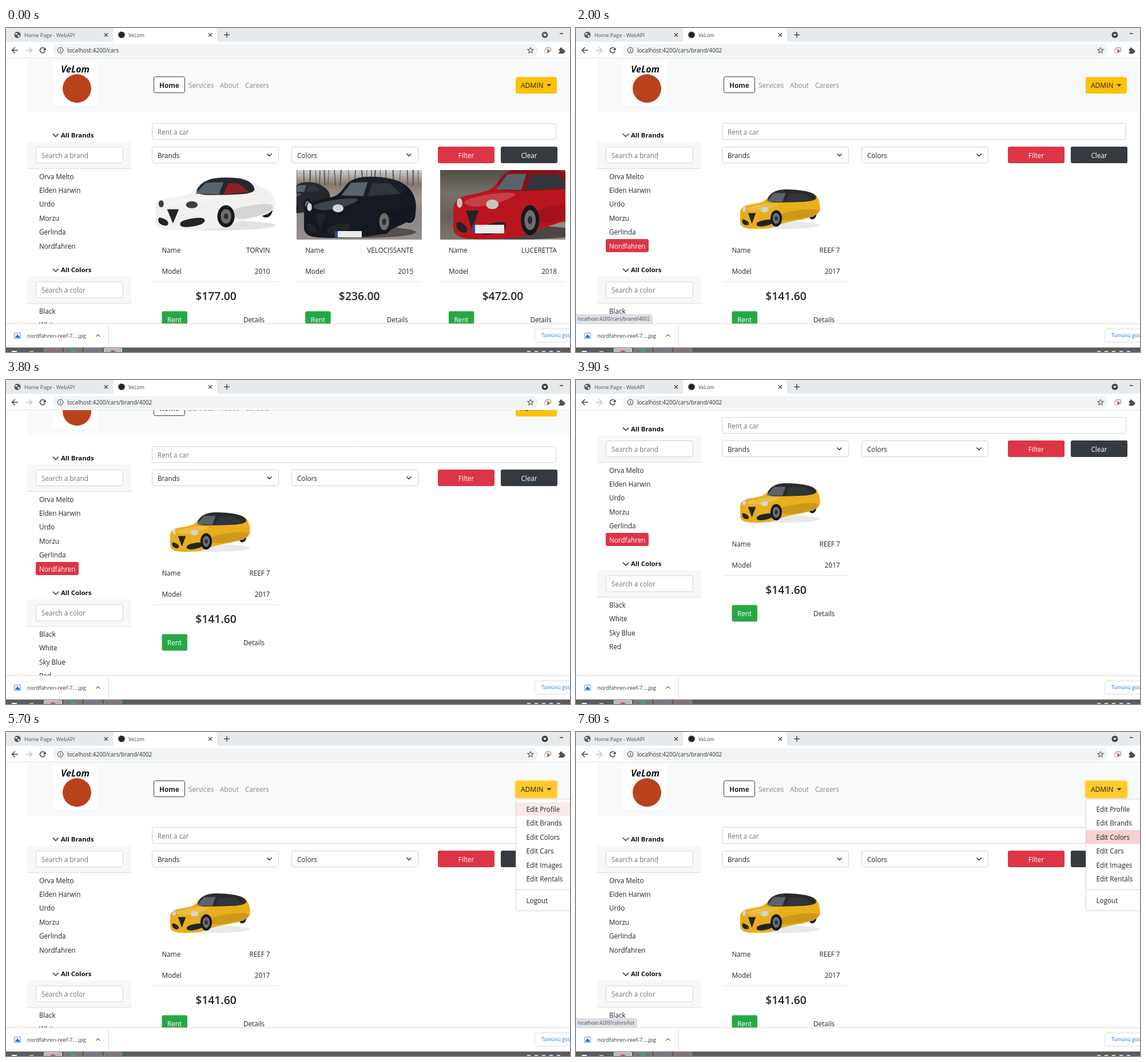
An HTML page with a canvas that plays this animation: 986 by 568 pixels, repeating every 8000 ms.

```html
<!DOCTYPE html>
<html lang="en">
<head>
<meta charset="utf-8">
<title>Car rental</title>
<style>
  html, body { margin: 0; width: 100%; height: 100%; overflow: hidden; background: #fff; }
  canvas { display: block; width: 986px; height: 568px; }
</style>
</head>
<body>
<canvas id="stage" width="986" height="568"></canvas>
<script>
const c = document.getElementById('stage').getContext('2d');
const LOOP = 8000, ROW = 24.4, CARD = 250.7;
const INK = '#212529', GREY = '#6c757d', LINE = '#ced4da', RED = '#dc3545';
const ICON = '#3c4043', SOFT = '#5f6368', EDGE = '#dadce0';
const FONT = '"Open Sans", "Noto Sans", sans-serif';

const brands = ['Orva Melto', 'Elden Harwin', 'Urdo', 'Morzu', 'Gerlinda', 'Nordfahren'];
const colors = ['Black', 'White', 'Sky Blue', 'Red'];
const menu = ['Profile', 'Brands', 'Colors', 'Cars', 'Images', 'Rentals'];
const fleet = [
  { name: 'TORVIN', year: 2010, price: '$177.00', photo: roadster },
  { name: 'VELOCISSANTE', year: 2015, price: '$236.00', photo: coupe },
  { name: 'LUCERETTA', year: 2018, price: '$472.00', photo: redCar }
];
const found = [{ name: 'REEF 7', year: 2017, price: '$141.60', photo: hatchback }];

// Motion: everything advances in steps of 100 ms
const clamp = (v, lo, hi) => Math.min(hi, Math.max(lo, v));
const ramp = (t, from, to) => clamp((t - from) / (to - from), 0, 1);
const within = (t, from, to) => t >= from && t < to;

const scrollAt = t => within(t, 3800, 4700) ? 102 * ramp(t, 3700, 3900) : 0;
const brandAt = t => within(t, 1000, 5400) ? (t < 1100 ? 4 : 5) : -1;
const statusAlpha = t => ramp(t, 1300, 1500) - ramp(t, 2600, 2900) + ramp(t, 6700, 6900);
function menuAt(t) {
  if (t < 5700) return -1;
  if (t < 6500) return clamp((t - 5900) / 100, 0, 4);
  if (t < 7200) return 5;
  return clamp(4 - Math.floor((t - 7200) / 200), 2, 4);
}
function statusUrl(t) {
  if (t < 5000) return 'localhost:4200/cars/brand/4002';
  const item = menu[menuAt(t)] || 'Cars';
  return `localhost:4200/${item === 'Images' ? 'carimages' : item.toLowerCase()}/list`;
}

function font(size, weight = 400, style = '') {
  c.font = `${style} ${weight} ${size}px ${FONT}`;
}
function text(s, x, y, { size = 11.7, color = INK, align = 'left', weight = 400, style = '' } = {}) {
  font(size, weight, style);
  c.fillStyle = color;
  c.textAlign = align;
  c.fillText(s, x, y);
}
function rect(x, y, w, h, color) {
  c.fillStyle = color;
  c.fillRect(x, y, w, h);
}
function box(x, y, w, h, fill, stroke, r = 3) {
  c.beginPath();
  c.roundRect(x, y, w, h, r);
  if (fill) { c.fillStyle = fill; c.fill(); }
  if (stroke) { c.strokeStyle = stroke; c.lineWidth = 1; c.stroke(); }
}
function trace(p) {
  c.beginPath();
  for (let i = 0; i < p.length; i += 2) c.lineTo(p[i], p[i + 1]);
}
function line(color, width, ...p) {
  trace(p);
  c.strokeStyle = color;
  c.lineWidth = width;
  c.stroke();
}
function poly(color, ...p) {
  trace(p);
  c.fillStyle = color;
  c.fill();
}
// Closed shape with rounded corners
function blob(color, ...p) {
  const n = p.length / 2, pt = i => [p[i % n * 2], p[i % n * 2 + 1]];
  c.beginPath();
  for (let i = 0; i <= n; i++) {
    const [x, y] = pt(i), [u, v] = pt(i + 1);
    if (i) c.quadraticCurveTo(x, y, (x + u) / 2, (y + v) / 2);
    else c.moveTo((x + u) / 2, (y + v) / 2);
  }
  c.fillStyle = color;
  c.fill();
}
function oval(color, x, y, rx, ry = rx) {
  c.beginPath();
  c.ellipse(x, y, rx, ry, 0, 0, 7);
  c.fillStyle = color;
  c.fill();
}
function ring(color, width, x, y, r, from = 0, to = 6.3) {
  c.beginPath();
  c.arc(x, y, r, from, to);
  c.strokeStyle = color;
  c.lineWidth = width;
  c.stroke();
}
function chevron(x, y, w) {
  line(INK, 1.4, x - w, y - w / 2, x, y + w / 2, x + w, y - w / 2);
}
function arrow(color, x, dir) {
  line(color, 1.5, x - 5, 39, x + 5, 39);
  line(color, 1.5, x + dir * .5, 34, x + dir * 5.5, 39, x + dir * .5, 44);
}
function cross(x, y) {
  for (const s of [3, -3]) line(ICON, 1.3, x - 3, y - s, x + 3, y + s);
}

// Three-quarter view, facing left, in a unit box; front, rear and cabin place the wheels and roof end
function car({ x, y, w, h, paint, top, side = '#30363b', lamp = '#d0d5d9', shadow, front, rear, cabin }) {
  const wheel = (wx, wy, r) => {
    oval('#17181a', wx, wy, r, r * 3);
    oval('#6b6d70', wx, wy, r * .62, r * 2);
    oval('#2b2d30', wx, wy, r * .25, r * .8);
  };
  c.save();
  c.translate(x, y);
  c.scale(w, h);
  oval(shadow, .52, .92, .5, .1);
  wheel(rear, .6, .055);
  blob(paint, 0, .75, 0, .42, .22, .34, .32, .28, .43, -.02, .7, -.03, cabin, .05, 1.02, .3,
    1.02, .68, front + .08, .86, front - .06, 1, .12, 1.03, 0, .95);
  blob(top, .31, .31, .43, -.02, .7, -.04, cabin, .06, cabin + .04, .28, .58, .32);
  poly('#59636b', .34, .29, .43, .07, .58, .06, .54, .3);
  poly(side, .58, .3, .62, .08, cabin - .12, .08, cabin - .02, .26);
  blob('rgba(255,255,255,.18)', .05, .46, .32, .34, .54, .34, .36, .5, .15, .56);
  blob('rgba(0,0,0,.12)', front, .6, 1, .45, 1, .66, front + .08, .84);
  blob('#222427', .2, .83, .42, .74, .42, .9, .22, .98);
  blob('#222427', .02, .74, .11, .82, .11, .94, .03, .9);
  poly('#222427', .1, .6, .2, .6, .15, .88);
  oval(lamp, .31, .51, .05, .07);
  oval(lamp, .05, .49, .022, .07);
  wheel(front, .74, .073);
  c.restore();
}
function backdrop(x, ...stops) {
  const g = c.createLinearGradient(0, 249, 0, 371);
  stops.forEach((s, i) => g.addColorStop(i / (stops.length - 1), s));
  rect(x, 249, 219, 122, g);
}
function plate(x, y, w, h) {
  rect(x, y, w, h, '#e9ebec');
  rect(x, y, 5, h, '#2b4e9b');
}

function roadster() {
  car({ x: 261, y: 265, w: 206, h: 88, paint: '#f1f1ef', top: '#26282b', side: '#8d2029',
    lamp: '#3a3d42', shadow: '#e2e2e2', front: .6, rear: .94, cabin: .82 });
}
function coupe() {
  backdrop(508, '#cfd0d2', '#86796e', '#a0968e', '#8b8684', '#8f8a88', '#96918e');
  for (let i = 0; i < 22; i++) {
    const x = 508 + i * 10 + 4 * Math.sin(i * 7);
    line('#5b5048', 1 + i % 3 * .5, x, 249, x + 2 * Math.sin(i * 3), 276);
  }
  car({ x: 470, y: 272, w: 95, h: 52, paint: '#25282e', top: '#25282e', shadow: '#6a6563',
    front: .6, rear: .93, cabin: .85 });
  car({ x: 521, y: 264, w: 192, h: 102, paint: '#151922', top: '#1a1f28', shadow: '#55504f',
    front: .73, rear: .96, cabin: .9 });
  plate(575, 356, 47, 11);
}
function redCar() {
  backdrop(759, '#504e46', '#77706a', '#66605b', '#7d766f');
  poly('#928b84', 925, 371, 978, 322, 978, 371);
  car({ x: 782, y: 248, w: 220, h: 120, paint: '#b9151f', top: '#86121a', lamp: '#c7c5bf',
    shadow: '#4c4744', front: .61, rear: .87, cabin: .95 });
  plate(815, 345, 56, 15);
}
function hatchback() {
  car({ x: 287, y: 285, w: 137, h: 66, paint: '#e8ae1c', top: '#2a2b2c', shadow: '#e9e9e9',
    front: .46, rear: .92, cabin: .95 });
}

function card({ name, year, price, photo }, i) {
  const x = 257 + i * CARD, right = { align: 'right' };
  c.save();
  c.beginPath();
  c.rect(x, 249, 219.5, 122);
  c.clip();
  photo();
  c.restore();
  text('Name', x + 15.5, 394);
  text(name, x + 204.5, 394, right);
  text('Model', x + 15.5, 430.5);
  text(year, x + 204.5, 430.5, right);
  rect(x, 444, 219, 1, '#dee0e2');
  text(price, x + 110, 477, { size: 19.4, weight: 600, align: 'center' });
  box(x + 15.5, 496.6, 44.5, 29, '#28a745');
  text('Rent', x + 25, 515.5, { color: '#fff' });
  text('Details', x + 158, 515.5);
}

function sideList(y, title, hint, items, active) {
  chevron(87, y + 1, 5);
  text(title, 96, y + 4.5, { size: 11.4, weight: 700, color: '#111' });
  rect(37, y + 12, 182.5, 47, '#f7f7f7');
  rect(37, y + 59, 182.5, 1, '#dcdcdc');
  box(52.5, y + 21.5, 152, 28, '#fff', LINE);
  text(hint, 62, y + 40.5, { color: GREY });
  items.forEach((s, i) => {
    const mid = y + 73 + i * ROW, on = i === active;
    if (on) {
      font(11.7);
      box(52, mid - 12, Math.round(c.measureText(s).width) + 12, 23, RED);
    }
    text(s, 58, mid + 4.5, { color: on ? '#fff' : INK });
  });
}

function select(label, x) {
  box(x, 208.5, 221, 28, '#fff', LINE);
  text(label, x + 9.5, 227.5);
  chevron(x + 205, 222.5, 4);
}
function button(label, x, color) {
  box(x, 208, 99, 29, color);
  text(label, x + 49.5, 227.5, { color: '#fff', align: 'center' });
}

function page(t) {
  c.save();
  c.beginPath();
  c.rect(0, 53, 986, 465);
  c.clip();
  c.translate(0, -scrollAt(t));

  rect(37, 53, 949, 94.5, '#f8f9fa');
  rect(82, 58, 78, 78, '#fff');
  oval('#b8431b', 124, 106, 25);
  text('VeLom', 121, 78, { size: 16, weight: 700, style: 'italic', align: 'center', color: '#111' });
  box(258.5, 85.5, 54, 28, '#fff', '#343a40');
  text('Home', 268, 104.5, { weight: 700 });
  const link = { color: '#85888a' };
  text('Services', 319, 104.5, link);
  text('About', 374, 104.5, link);
  text('Careers', 418, 104.5, link);

  sideList(187, 'All Brands', 'Search a brand', brands, brandAt(t));
  sideList(423.5, 'All Colors', 'Search a color', colors, -1);

  box(255.5, 167.5, 706, 28, '#fff', LINE);
  text('Rent a car', 265, 187, { color: GREY });
  select('Brands', 255.5);
  select('Colors', 499.5);
  button('Filter', 755, RED);
  button('Clear', 865, '#343a40');

  (t < 1700 ? fleet : found).forEach(card);
  admin(t);
  c.restore();
}

function admin(t) {
  const open = ramp(t, 5300, 5500);
  if (open) {
    c.globalAlpha = open;
    box(889, 84, 76, 33, '#ffdf80', null, 5);
    c.globalAlpha = 1;
  }
  box(891, 86, 72, 29, t >= 5200 ? '#ffca2c' : '#ffc107');
  text('ADMIN', 900, 104.5, { size: 12 });
  poly(INK, 945.5, 98.5, 953.5, 98.5, 949.5, 102.5);
  if (!open) return;
  box(891.5, 117.5, 120, 196, '#fff', '#d2d3d4');
  menu.forEach((s, i) => {
    const y = 123.4 + i * ROW;
    if (i === menuAt(t)) rect(892, Math.round(y), 94, 24, t < 5800 ? '#fce8e9' : '#f8d0d2');
    text('Edit ' + s, 909.5, y + 16.5);
  });
  rect(892, 276, 94, 1, '#d5d7d9');
  text('Logout', 909.5, 299.5);
}

function tabs(t) {
  rect(0, 0, 986, 25, '#e7eaed');
  box(187, -1, 182, 34, '#fff', null, 7);
  oval('#55595d', 20, 12, 5.6);
  oval('#e7eaed', 18, 10.5, 2, 1.4);
  oval('#e7eaed', 22, 14, 1.6, 2);
  text('Home Page - WebAPI', 32, 15.5, { size: 9, color: '#4a4e52' });
  cross(175, 12);
  oval('#24272b', 202, 12, 5.8);
  text('VeLom', 214, 15.5, { size: 8.8, color: ICON });
  cross(357, 12);
  line(ICON, 1.4, 381, 12, 391, 12);
  line(ICON, 1.4, 386, 7, 386, 17);
  oval(t < 1400 ? '#5a5e62' : ICON, 942, 12, 5.5);
  poly('#fff', 939, 10.5, 945, 10.5, 942, 14.5);
  rect(968, 9, 6, 1.3, '#222');
}

function toolbar(t) {
  rect(0, 24, 986, 29, '#fff');
  rect(0, 52, 986, 1, '#dfe1e4');
  arrow(ICON, 16, -1);
  arrow('#bbbec1', 40, 1);
  ring(ICON, 1.5, 64, 39, 4.6, .3, 5.5);
  poly(ICON, 69.5, 34, 69.5, 39, 64.5, 39);
  box(82, 28, 848, 22, '#f1f3f4', null, 11);
  ring(SOFT, 1.2, 95, 39, 4.8);
  rect(94.4, 38, 1.3, 4, SOFT);
  rect(94.4, 36, 1.3, 1.3, SOFT);
  text('localhost:4200/cars' + (t < 1700 ? '' : '/brand/4002'), 107, 42.5, { size: 10, color: '#303438' });

  const star = [];
  for (let i = 0; i <= 10; i++) {
    const r = i % 2 ? 2.4 : 5.4, a = i * Math.PI / 5;
    star.push(917 + r * Math.sin(a), 39.3 - r * Math.cos(a));
  }
  line(SOFT, 1.1, ...star);
  box(943.5, 34.5, 9, 7, '#e9f3ea', '#6f9b78', 1);
  box(941.5, 37.5, 8, 6, '#fff', '#a5a8ab', 1);
  oval('#d84a43', 948, 40.5, 2.2);
  rect(966.5, 37, 8.5, 8, '#4d5156');
  oval('#4d5156', 970.5, 36.5, 2.3);
  oval('#4d5156', 975.3, 41, 2.3);
  oval('#fff', 966.5, 41, 1.7);
}

function shelf() {
  rect(0, 518, 986, 42, '#fff');
  rect(0, 518, 986, 1, EDGE);
  box(14.5, 534.5, 11, 10, '#d9ecfb', '#8fa3b4', 1);
  poly('#2d72b8', 16, 543, 20, 537, 25, 543);
  text('nordfahren-reef-7....jpg', 37, 543, { size: 9.5, color: '#303438' });
  line(SOFT, 1.2, 157.5, 541, 161, 537.5, 164.5, 541);
  rect(179, 522, 1, 34, EDGE);
  box(924.5, 527.5, 90, 23, '#fff', EDGE);
  text('Tümünü göster', 936, 542.3, { size: 8.7, color: '#1a73e8' });
}

function status(t) {
  c.globalAlpha = statusAlpha(t);
  const url = statusUrl(t);
  font(8.5);
  box(-1, 502.5, Math.round(c.measureText(url).width) + 8, 16, '#dee1e6', '#cfd2d6', [0, 3, 0, 0]);
  text(url, 3, 513, { size: 8.5, color: '#45494d' });
  c.globalAlpha = 1;
}

function taskbar(t) {
  rect(0, 560, 986, 8, '#5b5b5b');
  rect(0, 560, 986, 1, '#707070');
  const front = t < 1400 ? 3 : 0;
  ['#c65360', '#28a9b5', '#8a65b5', '#b25a68'].forEach((tint, i) => {
    const x = 66 + i * 35, on = i === front;
    box(x + .5, 561.5, 31, 12, on ? '#b9b9b9' : '#777', on ? '#dedede' : '#909090', 1);
    oval(tint, x + 16, 569, 5, 4);
  });
  rect(10, 566, 9, 2, '#eee');
  rect(41, 566.5, 7, 1.5, '#ccc');
  for (let x = 911; x < 970; x += 13) rect(x, 566, 6, 2, '#ccc');
}

function draw(t) {
  rect(0, 0, 986, 568, '#fff');
  page(t);
  tabs(t);
  toolbar(t);
  shelf();
  status(t);
  taskbar(t);
}

const start = performance.now();
function tick() {
  const t = (performance.now() - start) % LOOP;
  draw(Math.floor(t / 100) * 100);
  requestAnimationFrame(tick);
}
tick();
</script>
</body>
</html>
```
